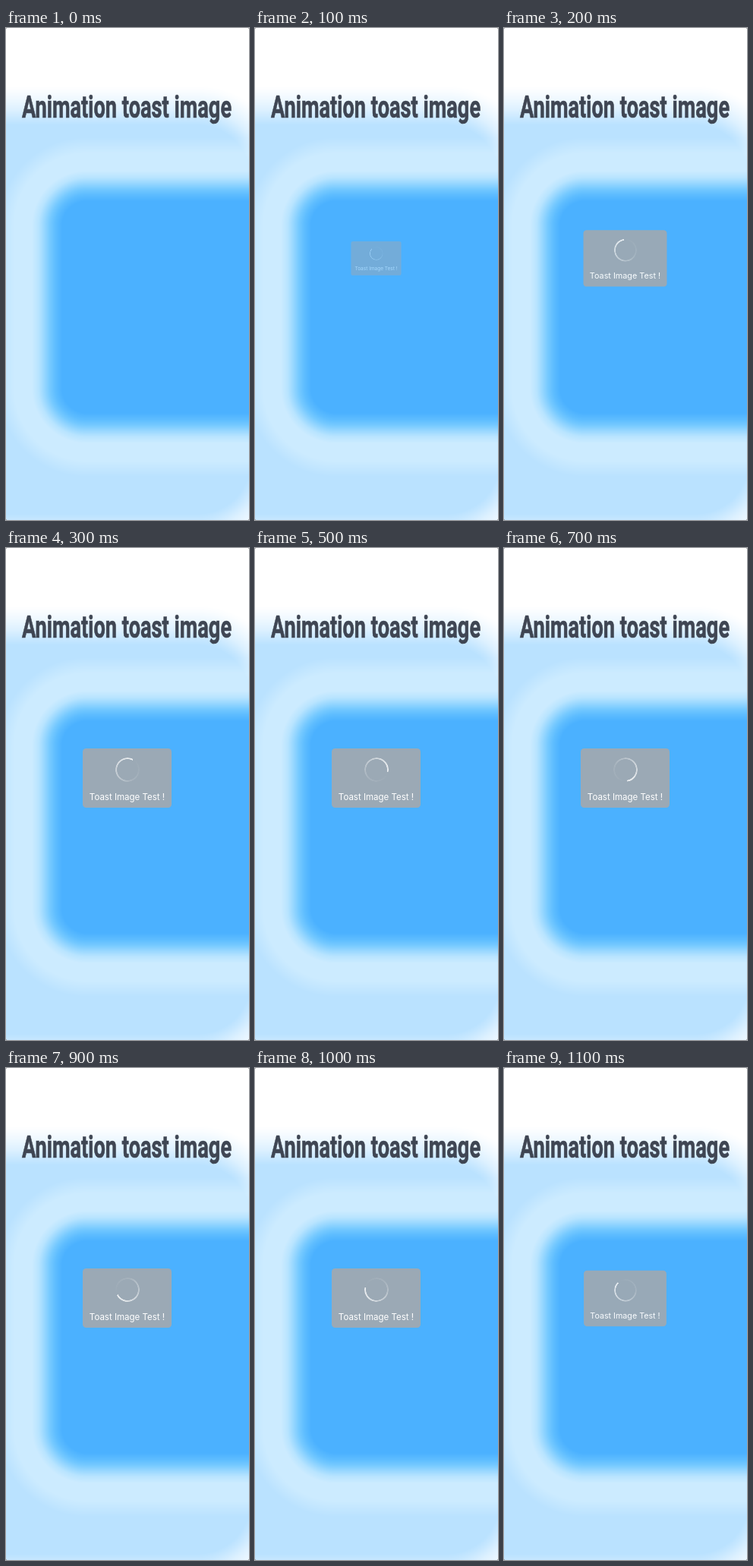
Animation of 320x648 px, one loop 1200 ms. Source, as an HTML page with a canvas:

```html
<!DOCTYPE html>
<html lang="en">
<head>
<meta charset="utf-8">
<title>Animation toast image</title>
<style>
  html, body { margin: 0; width: 100%; height: 100%; overflow: hidden; background: #555; }
  #stage { position: relative; width: 320px; height: 648px; overflow: hidden; border-radius: 2px; background: #fff; }
  #backdrop, #title { position: absolute; left: 0; top: 0; }
  #title text {
    font: 700 40px Roboto, "Liberation Sans", sans-serif;
    fill: #3f4653; stroke: #3f4653; stroke-width: .7; text-anchor: middle;
  }
  #toast {
    position: absolute; left: 101px; top: 263.5px; width: 117px; height: 78.5px;
    border-radius: 4.5px; background: #9ba9b5; opacity: 0;
  }
  #spinner {
    position: absolute; left: 42.5px; top: 12px; width: 32px; height: 32px; border-radius: 50%;
    background: conic-gradient(rgba(255,255,255,0), rgba(255,255,255,.12) 35%, rgba(255,255,255,.75) 92%, rgba(255,255,255,.8));
    -webkit-mask: radial-gradient(circle, transparent 13.6px, #000 14.2px);
    mask: radial-gradient(circle, transparent 13.6px, #000 14.2px);
  }
  #label {
    position: absolute; left: 0; top: 56px; width: 100%; text-align: center; white-space: nowrap;
    font: 400 11.5px/16px Inter, "Liberation Sans", sans-serif; color: #fff;
  }
</style>
</head>
<body>
<div id="stage">
  <canvas id="backdrop" width="320" height="648"></canvas>
  <svg id="title" width="320" height="140">
    <text transform="translate(159 118) scale(.68 1)">Animation toast image</text>
  </svg>
  <div id="toast">
    <div id="spinner"></div>
    <div id="label">Toast Image Test !</div>
  </div>
</div>
<script>
  const W = 320, H = 648, STEP = 100, STEPS = 12;
  const $ = id => document.getElementById(id);

  // Signed distance to a rounded box
  function boxDistance(x, y, box) {
    const { left, top, right, bottom, r } = box;
    const qx = Math.abs(x - (left + right) / 2) - (right - left) / 2 + r;
    const qy = Math.abs(y - (top + bottom) / 2) - (bottom - top) / 2 + r;
    return Math.hypot(Math.max(qx, 0), Math.max(qy, 0)) + Math.min(Math.max(qx, qy), 0) - r;
  }

  // Colour at d along stops of [distance, r, g, b]
  function ramp(stops, d) {
    if (d <= stops[0][0]) return stops[0].slice(1);
    for (let i = 1; i < stops.length; i++) {
      const a = stops[i - 1], b = stops[i];
      if (d <= b[0]) {
        const k = (d - a[0]) / (b[0] - a[0]);
        return [1, 2, 3].map(c => a[c] + (b[c] - a[c]) * k);
      }
    }
    return stops[stops.length - 1].slice(1);
  }

  const panel = { left: 74, top: 228, right: 700, bottom: 507, r: 32 };
  const halo = { left: -400, top: 128, right: 322, bottom: 640, r: 70 };
  const glow = [
    [0, 75, 177, 255], [9, 94, 189, 255], [16, 117, 201, 255], [23, 149, 214, 255],
    [31, 184, 228, 255], [40, 204, 235, 255], [63, 204, 235, 255], [84, 186, 226, 255]
  ];
  const fade = [[0, 0], [8, .18], [20, .5], [33, .74], [46, .94], [52, 1]];

  function paintBackdrop() {
    const ctx = $('backdrop').getContext('2d');
    const image = ctx.createImageData(W, H);
    for (let y = 0, i = 0; y < H; y++) {
      for (let x = 0; x < W; x++, i += 4) {
        const px = x + .5, py = y + .5;
        const color = ramp(glow, boxDistance(px, py, panel));
        const white = ramp(fade, boxDistance(px, py, halo))[0];
        for (let c = 0; c < 3; c++) image.data[i + c] = color[c] + (255 - color[c]) * white;
        image.data[i + 3] = 255;
      }
    }
    ctx.putImageData(image, 0, 0);
  }

  // Step: [scale, opacity]; every other step shows the toast in full
  const poses = { 0: [.3, 0], 1: [.565, .5], 2: [.94, .97], 11: [.93, .97] };

  function draw(now) {
    const step = Math.floor(now / STEP) % STEPS;
    const [scale, opacity] = poses[step] || [1, 1];
    $('toast').style.transform = `scale(${scale})`;
    $('toast').style.opacity = opacity;
    $('spinner').style.transform = `rotate(${step * 36 - 80}deg)`;
  }

  paintBackdrop();
  const start = performance.now();
  function tick() {
    draw(performance.now() - start);
    requestAnimationFrame(tick);
  }
  tick();
</script>
</body>
</html>
```
